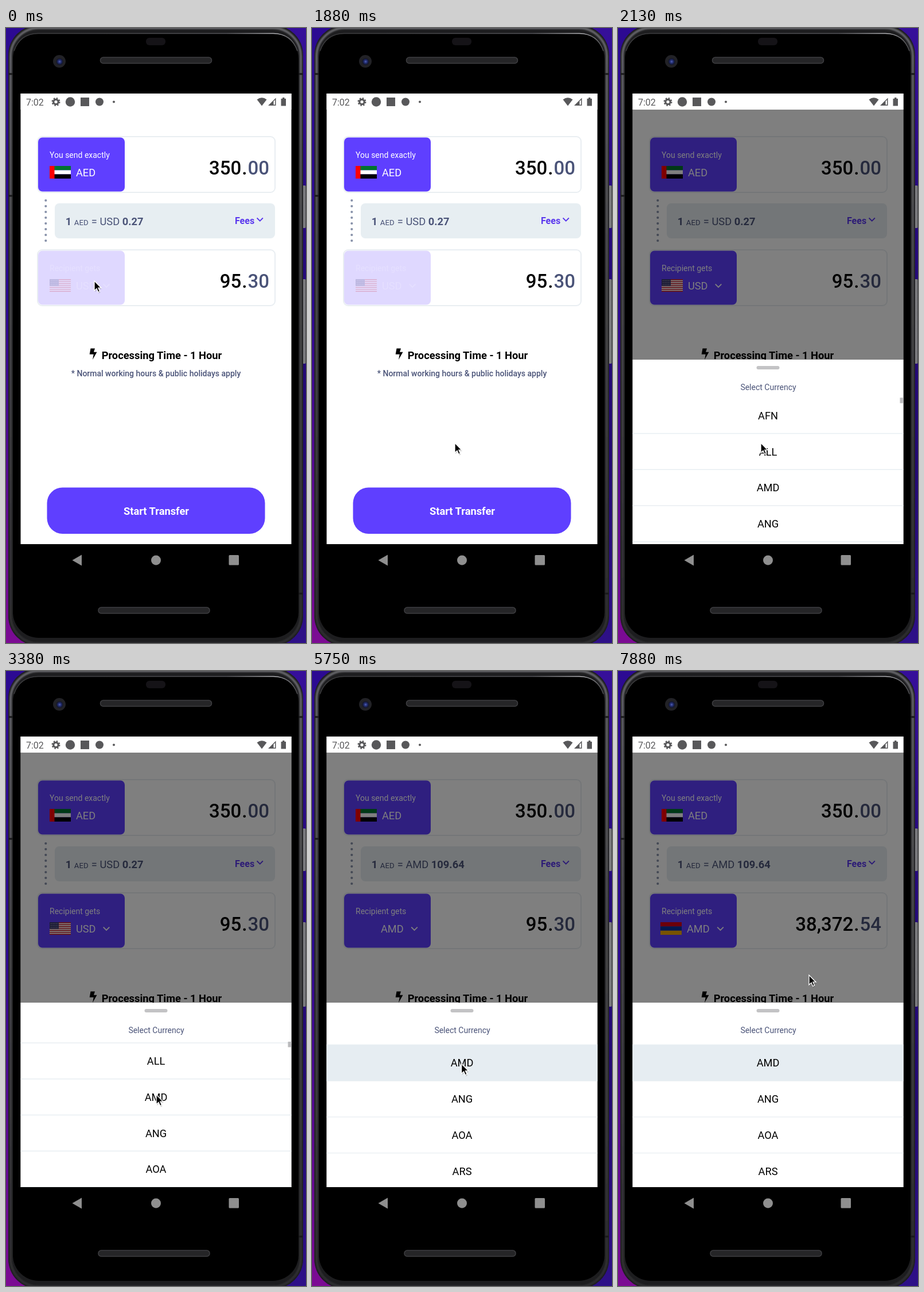
Write an HTML page that moves like this. It is 523 px wide and 1070 px high and loops after 8 s.

```html
<!DOCTYPE html>
<html lang="en">
<head>
<meta charset="utf-8">
<title>Currency picker</title>
<style>
  html, body { margin: 0; width: 100%; height: 100%; overflow: hidden; background: #24097a; }
  svg { display: block; width: 523px; height: 1070px; }
  text { font-family: Roboto, sans-serif; white-space: pre; }
  .mid { text-anchor: middle; }
  .end { text-anchor: end; }
  .bold { font-weight: 700; }
  .slate { fill: #4a5378; }
  .amount { font-size: 33px; font-weight: 500; }
  .card { fill: #fff; stroke: #e9eef2; stroke-width: 2; }
  .main { fill: #5f3fff; }
  .chev { fill: none; stroke-width: 1.8; }
</style>
</head>
<body>
<svg viewBox="0 0 523 1070" xmlns="http://www.w3.org/2000/svg">
  <defs>
    <linearGradient id="left" x2="0" y2="1">
      <stop offset="0" stop-color="#2c0a92"/><stop offset=".45" stop-color="#2b0a90"/>
      <stop offset=".75" stop-color="#5a0a90"/><stop offset="1" stop-color="#7c0b93"/>
    </linearGradient>
    <linearGradient id="right" x2="0" y2="1">
      <stop offset="0" stop-color="#360f9a"/><stop offset=".3" stop-color="#260a7c"/>
      <stop offset=".7" stop-color="#220972"/><stop offset="1" stop-color="#2e1088"/>
    </linearGradient>
    <linearGradient id="metal" x2="0" y2="1">
      <stop offset="0" stop-color="#66666a"/><stop offset=".4" stop-color="#4c4c4f"/><stop offset="1" stop-color="#2e2e30"/>
    </linearGradient>
    <linearGradient id="rim">
      <stop offset="0" stop-color="#3a3a3c"/><stop offset=".75" stop-color="#55555a"/>
      <stop offset=".92" stop-color="#b4b4b8"/><stop offset="1" stop-color="#4a4a4d"/>
    </linearGradient>
    <linearGradient id="key">
      <stop offset="0" stop-color="#3a3a3c"/><stop offset=".6" stop-color="#8c8c90"/><stop offset="1" stop-color="#4a4a4e"/>
    </linearGradient>
    <radialGradient id="lens">
      <stop offset="0" stop-color="#5361b8"/><stop offset=".45" stop-color="#222d70"/><stop offset="1" stop-color="#10121f"/>
    </radialGradient>
    <filter id="soft" x="-5%" y="-5%" width="110%" height="110%"><feGaussianBlur stdDeviation="1.1"/></filter>
    <clipPath id="body"><rect x="4" y="-5" width="514" height="1080" rx="52"/></clipPath>
    <clipPath id="screen"><rect x="25.500" y="114" width="472" height="784"/></clipPath>
    <clipPath id="window"><rect x="25" y="644" width="473" height="254"/></clipPath>
  </defs>

  <!-- Phone -->
  <rect width="262" height="1070" fill="url(#left)"/>
  <rect x="262" width="261" height="1070" fill="url(#right)"/>
  <rect x="515" y="274" width="8" height="74" rx="2" fill="url(#key)"/>
  <rect x="515" y="437" width="8" height="147" rx="2" fill="url(#key)"/>
  <g clip-path="url(#body)">
    <rect x="4" y="-5" width="514" height="1080" fill="#1d1d1f"/>
    <rect x="8" y="0" width="506" height="1071" rx="49" fill="none" stroke="url(#metal)" stroke-width="4" filter="url(#soft)"/>
    <path d="M5 80h8M5 292h8M509 80h8M509 984h8" stroke="#19191a" stroke-width="3"/>
    <rect x="12" y="9" width="498" height="1052" rx="45" fill="#000"/>
    <path d="M14 40Q24 10 56 9.500H466Q498 10 508 40" fill="none" stroke="url(#rim)" stroke-width="1.500"/>
  </g>
  <rect x="244" y="17" width="34" height="13" rx="6" fill="#151317"/>
  <circle cx="93" cy="58" r="11" fill="#222226"/>
  <circle cx="93.500" cy="58.500" r="6" fill="url(#lens)"/>
  <g fill="#252527" stroke="#3e3e41" stroke-width="1.500">
    <rect x="164.500" y="51" width="194" height="10.500" rx="5"/>
    <rect x="161" y="1008" width="194" height="10.500" rx="5"/>
  </g>
  <g fill="#8f8f8f">
    <path d="M115.500 926L132 916.500V935.500Z"/>
    <circle cx="261.500" cy="926" r="8.500"/>
    <rect x="388.500" y="917" width="17.500" height="17.500" rx="1.500"/>
  </g>

  <g clip-path="url(#screen)">
    <rect x="25" y="114" width="473" height="784" fill="#fff"/>

    <!-- Transfer form -->
    <rect class="card" x="55" y="189" width="414" height="97" rx="8"/>
    <rect class="main" x="56" y="190.500" width="151" height="94" rx="7.500"/>
    <text x="76" y="225.500" font-size="14" fill="#fff">You send exactly</text>
    <path d="M76 240h37v7.500h-37z" fill="#00732f"/>
    <path d="M76 247.500h37v7h-37z" fill="#fff"/>
    <path d="M76 254.500h37v7.500h-37z" fill="#000"/>
    <path d="M76 240h8.500v22h-8.500z" fill="#f00"/>
    <text x="122" y="258" font-size="18.200" fill="#fff">AED</text>
    <text class="amount end" x="459" y="255">350<tspan dx="1">.</tspan><tspan dx="1" class="slate">00</tspan></text>

    <path d="M69.300 300v71" stroke="#8791a9" stroke-width="4.200" stroke-linecap="round" stroke-dasharray="0 10"/>
    <rect x="85" y="305" width="384" height="61" rx="8" fill="#e7eef2"/>
    <text class="slate" x="103.800" y="343" font-size="18.300"><tspan class="bold">1</tspan> <tspan font-size="13.200">AED</tspan><tspan dx=".7"> = </tspan><tspan id="pair">USD</tspan> <tspan id="rate" class="bold">0.27</tspan></text>
    <text class="bold" x="399" y="341" font-size="16" fill="#5a37ee">Fees</text>
    <path class="chev" d="M437.500 330.500l5.200 5.200 5.200-5.200" stroke="#5a37ee"/>

    <rect class="card" x="55" y="386" width="414" height="97" rx="8"/>
    <rect id="tile" class="main" x="56" y="387.500" width="151" height="94" rx="7.500"/>
    <g id="label">
      <text x="76" y="422.500" font-size="14" fill="#fff">Recipient gets</text>
      <g id="usFlag">
        <path d="M76 437h37v22h-37z" fill="#fff"/>
        <path d="M94.500 437v22" stroke="#c8202f" stroke-width="37" stroke-dasharray="1.692"/>
        <path d="M76 437h16v11.800h-16z" fill="#3c3b6e"/>
        <path d="M78 439.500h13M78 442.900h13M78 446.300h13" stroke="#c9c9dc" stroke-dasharray="1 1.500"/>
      </g>
      <g id="amFlag">
        <path d="M74 437h37v7.400h-37z" fill="#d90012"/>
        <path d="M74 444.400h37v7.300h-37z" fill="#0033a0"/>
        <path d="M74 451.700h37v7.300h-37z" fill="#f2a800"/>
      </g>
      <text id="code" y="455" font-size="18.200" fill="#fff">USD</text>
      <path id="arrow" class="chev" d="M-5.300 445.700l5.300 5.300 5.300-5.300" stroke="#fff"/>
    </g>
    <text class="amount end" x="459" y="452"><tspan id="whole">95</tspan><tspan dx="1">.</tspan><tspan id="cents" dx="1" class="slate">30</tspan></text>

    <path d="M147.500 557.500h7.500l-2 6.200h5.500l-7.500 13.300 1.700-9.300h-7z"/>
    <text class="bold mid" x="271.500" y="576" font-size="18.300">Processing Time - 1 Hour</text>
    <text class="slate mid" x="261.500" y="606" font-size="14" font-weight="500">* Normal working hours &amp; public holidays apply</text>
    <rect class="main" x="71.500" y="799.500" width="380" height="80.500" rx="27"/>
    <text class="bold mid" x="262" y="847" font-size="18.300" fill="#fff">Start Transfer</text>

    <!-- Bottom sheet -->
    <rect id="shade" x="25" y="142" width="473" height="756"/>
    <g id="sheet">
      <rect x="25" y="577" width="473" height="321" fill="#fff"/>
      <rect x="241.500" y="588" width="40" height="6" rx="3" fill="#c3c3c5"/>
      <text class="slate mid" x="262" y="630" font-size="14">Select Currency</text>
      <g clip-path="url(#window)"><g id="list"></g></g>
      <rect id="bar" x="491.500" width="6" height="9.500" fill="#bcbcbe"/>
    </g>

    <!-- Status bar -->
    <rect x="25" y="114" width="473" height="28" fill="#fff"/>
    <g fill="#58585a">
      <text x="35" y="134.500" font-size="16">7:02</text>
      <g fill="none" stroke="#58585a">
        <circle cx="87" cy="128.500" r="4.200" stroke-width="3.200"/>
        <circle cx="87" cy="128.500" r="6.300" stroke-width="2.400" stroke-dasharray="2.474"/>
      </g>
      <circle cx="112" cy="128.500" r="8.200"/>
      <rect x="130" y="121" width="15" height="15"/>
      <circle cx="163" cy="128.500" r="7"/>
      <circle cx="188" cy="128.500" r="2"/>
      <path d="M446 135.500L437.500 124.500Q446 118 454.500 124.500Z"/>
      <path d="M470.500 121.500V135H457Z"/>
      <path d="M466.500 127.500l2.500-2.500v8.500h-2.500z" fill="#fff"/>
      <path d="M479.500 123h2.500v-2h3.500v2h2.500v12.500h-8.500z"/>
    </g>
  </g>

  <g id="cursor">
    <path d="M1 2V19L5 15.300 7.700 21.500 10.500 20.200 7.900 14.200H13Z" fill="#000" opacity=".18"/>
    <path d="M0 0V17L4 13.300 6.700 19.500 9.500 18.200 6.900 12.200H12Z" stroke="#fff" stroke-width="1.300"/>
  </g>
</svg>

<script>
const LOOP = 8000, STEP = 125;
const ROW = 62.75, TOP = 644;
const CODES = ['AED', 'AFN', 'ALL', 'AMD', 'ANG', 'AOA', 'ARS', 'AUD'];
const PICK = 3, PICK_AT = 5500, QUOTE_AT = 6750;

// Tracks of [time, value, ...]; values ease between neighbouring keys.
const tracks = {
  cursor: [[0, 154, 440], [250, 154, 440], [1500, 249, 722], [2125, 249, 722], [2625, 254, 672],
    [3375, 262, 737], [4250, 264, 684], [5000, 264, 684], [6375, 258, 683], [6875, 258, 683], [7875, 333, 529]],
  scroll: [[1875, 0], [2125, 64], [2625, 122.5], [3375, 122.5], [4250, 181.9]],
  open: [[1875, 0], [2125, 1]],
  press: [[4375, 0], [4500, .28], [4750, 1]]
};

const $ = id => document.getElementById(id);
const ease = x => x * x * (3 - 2 * x);

function at(keys, t) {
  const i = keys.findIndex(k => k[0] > t);
  if (i === 0) return keys[0].slice(1);
  if (i < 0) return keys[keys.length - 1].slice(1);
  const a = keys[i - 1], b = keys[i], p = ease((t - a[0]) / (b[0] - a[0]));
  return a.slice(1).map((v, j) => v + (b[j + 1] - v) * p);
}

const set = (id, name, value) => $(id).setAttribute(name, value);
const show = (id, on) => set(id, 'visibility', on ? 'visible' : 'hidden');
const write = (id, value) => { if ($(id).textContent !== value) $(id).textContent = value; };

$('list').innerHTML = CODES.map((code, i) => {
  const y = TOP + i * ROW;
  const tint = i === PICK ? `<rect id="tint" x="25" y="${y}" width="473" height="${ROW}" fill="#e6edf2"/>` : '';
  return `${tint}<path d="M25 ${y + ROW}h473" stroke="#e8eef2" stroke-width="1.3"/>
    <text class="mid" x="261.5" y="${y + 38}" font-size="18.2">${code}</text>`;
}).join('');

function draw(t) {
  const [x, y] = at(tracks.cursor, t);
  const [scroll] = at(tracks.scroll, t);
  const [open] = at(tracks.open, t);
  const [press] = at(tracks.press, t);
  const picked = t >= PICK_AT, quoted = t >= QUOTE_AT;

  set('cursor', 'transform', `translate(${x} ${y})`);
  set('tile', 'opacity', .2 + .8 * open);
  set('label', 'opacity', .2 + .8 * open);
  set('shade', 'opacity', .5 * open);
  set('sheet', 'transform', `translate(0 ${321 * (1 - open)})`);
  set('list', 'transform', `translate(0 ${-scroll})`);
  set('tint', 'opacity', press);
  set('bar', 'y', 641.3 + scroll * .03);
  show('bar', t < 4500);

  write('code', picked ? 'AMD' : 'USD');
  set('code', 'x', picked ? 120 : 122);
  set('arrow', 'transform', `translate(${picked ? 178.5 : 175} 0)`);
  write('pair', picked ? 'AMD' : 'USD');
  write('rate', picked ? '109.64' : '0.27');
  show('usFlag', !picked);
  show('amFlag', quoted);
  write('whole', quoted ? '38,372' : '95');
  write('cents', quoted ? '54' : '30');
}

function tick() {
  const t = performance.now() % LOOP;
  draw(Math.floor(t / STEP) * STEP);
  requestAnimationFrame(tick);
}
tick();
</script>
</body>
</html>
```
